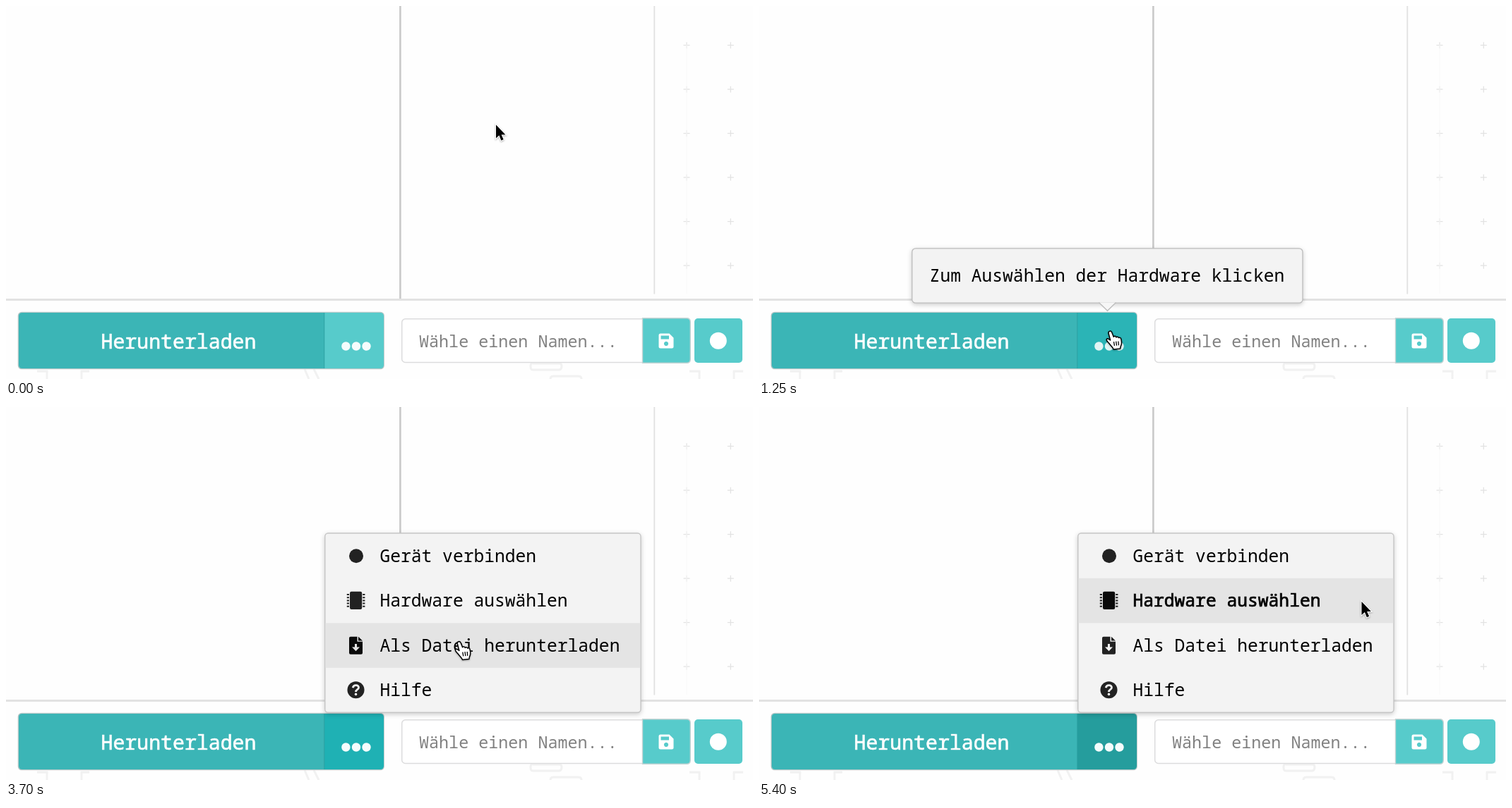
Recreate the animation shown at these times as an HTML page. Size 1058 by 529 pixels, loop 5.92 s.

```html
<!DOCTYPE html>
<html lang="de">
<head>
<meta charset="utf-8">
<title>Hardware auswählen</title>
<style>
  html, body { margin: 0; width: 100%; height: 100%; overflow: hidden; background: #fefefe; }
  svg { display: block; width: 100%; height: 100%; }
  text { font: 24.65px "Noto Sans Mono", "DejaVu Sans Mono", monospace; white-space: pre; }
  .float { filter: drop-shadow(0 2px 3px rgba(0, 0, 0, .2)); }
  .cursor { filter: drop-shadow(0 1.5px 1.2px rgba(0, 0, 0, .3)); }
  .line { fill: none; }
  .item { fill: #222; }
  .item text { fill: #000; }
  .item.hover { fill: #0a0a0a; }
  .row { fill: transparent; }
  .hover .row { fill: #e4e4e4; }
  .cut { fill: #f3f3f3; }
  .hover .cut { fill: #e4e4e4; }
  .item.chosen text { stroke: #000; stroke-width: .7px; }
</style>
</head>
<body>
<svg viewBox="0 0 1058 529" preserveAspectRatio="none">
  <rect width="1058" height="529" fill="#fefefe"/>

  <!-- workspace -->
  <path id="grid" class="line" stroke="#e2e2e2" stroke-width="1.2"/>
  <path class="line" stroke="#f8f8f8" d="M964 55V408"/>
  <path class="line" stroke="#e1e1e1" stroke-width="1.8" d="M918.3 0V408.5"/>
  <path class="line" stroke="#c9c9c9" stroke-width="2.6" d="M558.4 0V415"/>
  <path class="line" stroke="#e2e2e2" stroke-width="3" d="M0 416.5H1058"/>
  <path class="line" stroke="#f1f1f1" stroke-width="3"
    d="M44 518H58V529M118 518H107V529M423 515L429 529M436 515L443 529
       M746 507H784Q787 507 787 511T784 516H746Q743 516 743 511T746 507
       M771 529Q771 525 775 525H811Q815 525 815 529
       M968 518H982V529M1044 518H1031V529"/>

  <!-- toolbar -->
  <rect x="16.7" y="433.7" width="519.2" height="81.6" rx="5.5" fill="#b9c9c9"/>
  <path d="M451 435H23Q18 435 18 440V509Q18 514 23 514H451Z" fill="#3bb5b6"/>
  <path id="more" d="M451 435H530Q535 435 535 440V509Q535 514 530 514H451Z"/>
  <path class="line" stroke="#2c9fa0" stroke-opacity=".75" stroke-width="1.2" d="M450.7 435V514"/>
  <text x="134.5" y="485.5" fill="#fff" stroke="#fff" stroke-width=".6" style="font-size:28.2px">Herunterladen</text>
  <g id="dots">
    <circle cx="481.4" cy="482.5" r="6.2"/>
    <circle cx="496" cy="482.5" r="6.2"/>
    <circle cx="510.5" cy="482.5" r="6.2"/>
  </g>
  <rect x="560.7" y="443.7" width="350" height="61.8" rx="5" fill="#fff" stroke="#dcdcdd" stroke-width="1.5"/>
  <text x="585" y="483.5" fill="#818181" style="font-size:23.4px">Wähle einen Namen...</text>
  <path d="M901.5 442.8H964Q969.3 442.8 969.3 448V501Q969.3 506.3 964 506.3H901.5Z" fill="#57cbcb" stroke="#c4d4d4" stroke-width="1.4"/>
  <path fill="#fff" fill-rule="evenodd" d="M927 464.5H939.5L945.5 470.5V483Q945.5 485.5 943 485.5H927Q924.5 485.5 924.5 483V467Q924.5 464.5 927 464.5Z
    M927.5 467.5V472.5H939V467.5Z M935 475.8a3.1 3.1 0 1 0 .01 0Z"/>
  <rect x="975" y="443" width="68" height="63" rx="5" fill="#57cbcb"/>
  <circle cx="1008.8" cy="474.7" r="12" fill="#fff"/>

  <!-- tooltip -->
  <g id="tip">
    <rect class="float" x="216.8" y="343.8" width="553.2" height="77.4" rx="5" fill="#f3f3f3" stroke="#bcbcbc" stroke-width="1.3"/>
    <path d="M481.5 420.5L493.5 432.3L505.5 420.5" fill="#f6f6f6" stroke="#bcbcbc" stroke-width="1.3"/>
    <text x="241.6" y="391.3">Zum Auswählen der Hardware klicken</text>
  </g>

  <!-- menu -->
  <g id="menu">
    <rect class="float" x="451.8" y="179" width="447.2" height="254.3" rx="4.5" fill="#f3f3f3" stroke="#c6c6c6" stroke-width="1.4"/>
    <g class="item">
      <rect class="row" x="452.5" y="179.7" width="445.8" height="63"/>
      <circle cx="496" cy="211.3" r="10"/>
      <text x="529.4" y="220">Gerät verbinden</text>
    </g>
    <g class="item">
      <rect class="row" x="452.5" y="242.8" width="445.8" height="63.6"/>
      <rect x="487" y="261.8" width="17.2" height="25.2" rx="2.2"/>
      <path class="line" stroke="#222" stroke-width="2" d="M482.8 266H486M482.8 270.2H486M482.8 274.4H486M482.8 278.6H486M482.8 282.8H486
        M505.2 266H508.4M505.2 270.2H508.4M505.2 274.4H508.4M505.2 278.6H508.4M505.2 282.8H508.4"/>
      <text x="529.4" y="283.3">Hardware auswählen</text>
    </g>
    <g class="item">
      <rect class="row" x="452.5" y="306.4" width="445.8" height="63.4"/>
      <path d="M488 325.7H497.5V332.7H505V348.8Q505 350.8 503 350.8H488Q486 350.8 486 348.8V327.7Q486 325.7 488 325.7ZM499 325.7L505 331.5H499Z"/>
      <path class="cut" d="M494 336H497V340.5H501L495.5 346.3L490 340.5H494Z"/>
      <text x="529.4" y="347">Als Datei herunterladen</text>
    </g>
    <g class="item">
      <rect class="row" x="452.5" y="369.8" width="445.8" height="62.8"/>
      <circle cx="495.5" cy="401.3" r="12"/>
      <path class="line" stroke="#f3f3f3" stroke-width="2.8" d="M491.3 398.3C492 393.3 500 393.6 499.5 398.2C499.2 400.8 495.5 400.6 495.5 404"/>
      <circle class="cut" cx="495.5" cy="407.4" r="1.8"/>
      <text x="529.4" y="410.3">Hilfe</text>
    </g>
  </g>

  <!-- pointers, drawn around their hot spot -->
  <path id="arrow" class="cursor" d="M0 0V19L4.4 15L7.4 22.2L10.6 20.8L7.6 13.9H13.4Z" stroke="#fff" stroke-width="2.2" paint-order="stroke"/>
  <g id="hand" class="cursor">
    <path d="M-2.3 2.5C-2.8 -.6 1.2 -1.4 2.4 1.2L5 7.8C5.6 6.4 8.1 6.5 8.7 8.4C9.6 7.2 11.8 7.5 12.2 9.1C13.2 8.3 15 8.9 15.4 10.4
      C16 12.8 16.6 15.5 16 18.2C15.5 20.4 14.4 21.5 14.3 24.6L5 25.4C4 22.6 1 20.3 -1.4 17C-3.6 14.2 -5.7 13 -5 11.2C-4.2 9.5 -1.8 10.4 .3 12.4Z"
      fill="#fff" stroke="#000" stroke-width="1.5" stroke-linejoin="round"/>
    <path class="line" stroke="#000" stroke-width="1.3" d="M5.2 14.6L6.2 20.4M8.4 14.2L9.3 20.2M11.6 14L12.2 19.8"/>
  </g>
</svg>
<script>
const LOOP = 5920, STEP = 50;
const el = id => document.getElementById(id);
const items = [...document.querySelectorAll('.item')];

const ease = {
  line: p => p,
  both: p => p * p * (3 - 2 * p),
  start: p => p ** 1.5,
  end: p => 1 - (1 - p) ** 2
};

// Each entry: time, values, easing on the way there
const pointer = [
  [450, [694, 168.5]],
  [1050, [498.5, 446.5], 'both'],
  [1250, [497.3, 461.5], 'end'],
  [3150, [497.3, 461.5]],
  [3200, [497.3, 459.5]],
  [3750, [645, 330], 'both'],
  [4100, [773, 293.5], 'start'],
  [4350, [809, 290.5], 'end'],
  [4750, [853.5, 276], 'both']
];
const idle = [87, 203, 203], hover = [43, 180, 182], pressed = [37, 157, 157], open = [31, 177, 180];
const moreColor = [
  [900, idle], [1050, hover], [2200, hover], [2250, pressed],
  [2300, pressed], [2550, open], [5200, open], [5400, pressed]
];
const tipScale = [
  [1000, [0]], [1050, [.22]], [1100, [.62]], [1150, [.86]], [1200, [.97]], [1250, [1]],
  [2300, [1]], [2500, [0], 'both']
];

function sample(keys, t) {
  const i = keys.findIndex(k => k[0] > t);
  if (i === 0) return keys[0][1];
  if (i < 0) return keys[keys.length - 1][1];
  const [t0, from] = keys[i - 1], [t1, to, kind = 'line'] = keys[i];
  const p = ease[kind]((t - t0) / (t1 - t0));
  return from.map((v, n) => v + (to[n] - v) * p);
}

const show = (node, on) => node.setAttribute('visibility', on ? 'visible' : 'hidden');

function draw(time) {
  const t = Math.floor(time % LOOP / STEP) * STEP;
  const [x, y] = sample(pointer, t);
  const [scale] = sample(tipScale, t);
  const menuOpen = t >= 2350;
  const overButton = x < 536 && y > 434;
  const isHand = (overButton || menuOpen) && t < 5300;

  el('more').setAttribute('fill', `rgb(${sample(moreColor, t).map(Math.round)})`);
  el('dots').setAttribute('fill', t >= 1050 && t < 3250 ? '#e2f4f4' : '#f5fcfc');

  show(el('tip'), scale > 0);
  el('tip').setAttribute('transform', `translate(493.5 422) scale(${scale}) translate(-493.5 -422)`);

  show(el('menu'), menuOpen);
  const row = x > 452 && y < 433 ? Math.floor((y - 179.5) / 63.4) : -1;
  items.forEach((item, i) => {
    item.classList.toggle('hover', menuOpen && i === row);
    item.classList.toggle('chosen', i === 1 && t >= 5250);
  });

  for (const id of ['arrow', 'hand']) el(id).setAttribute('transform', `translate(${x} ${y})`);
  show(el('arrow'), !isHand);
  show(el('hand'), isHand);
}

el('grid').setAttribute('d', [964, 1026.3].map(x =>
  Array.from({ length: 6 }, (_, i) => `M${x - 4.5} ${55.7 + i * 62.5}h9m-4.5 -4.5v9`).join('')).join(''));

const began = performance.now();
function frame() {
  draw(performance.now() - began);
  requestAnimationFrame(frame);
}
frame();
</script>
</body>
</html>
```
